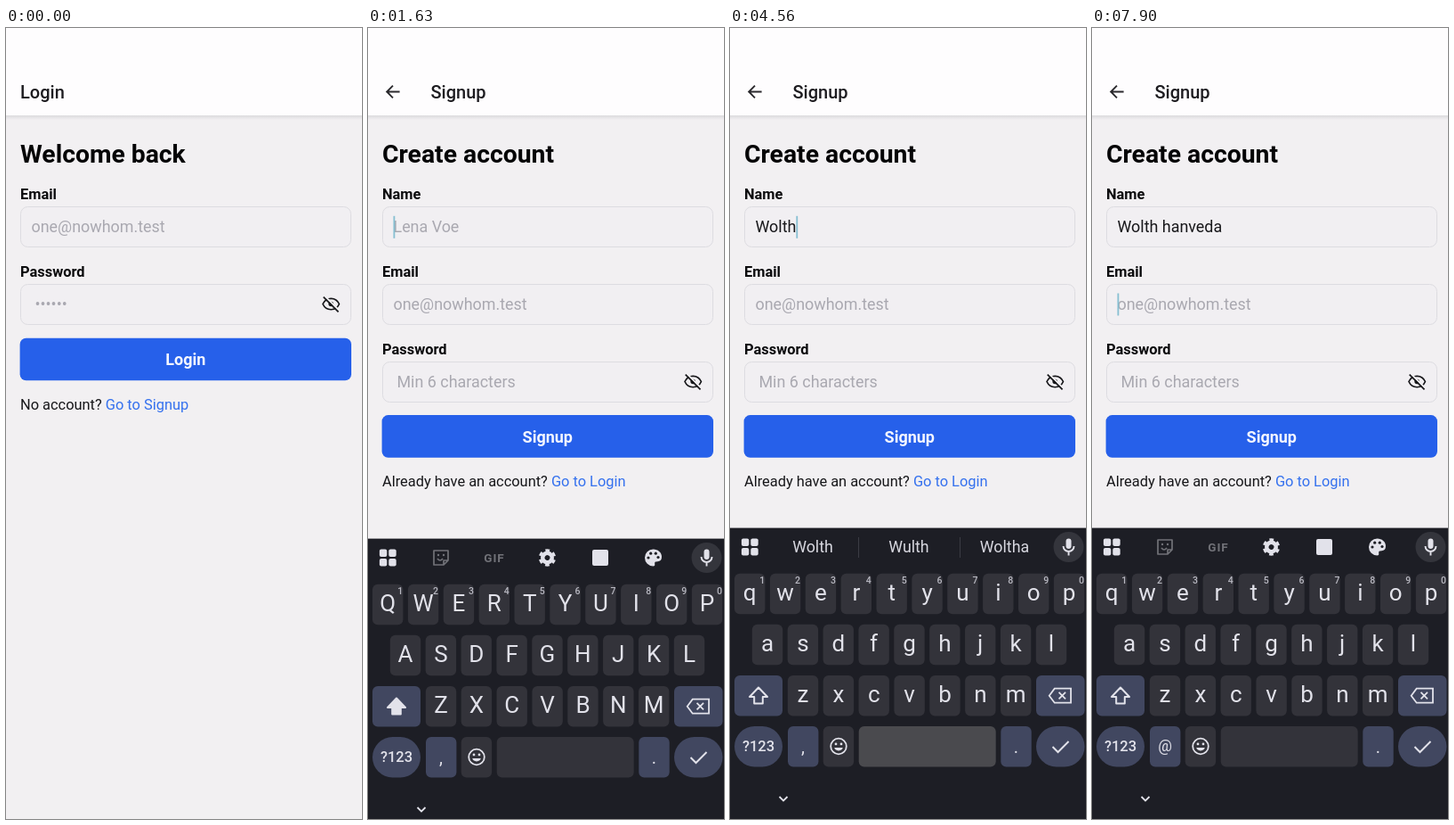
Write an HTML page that moves like this. It is 400 px wide and 887 px high and loops after 8000 ms.

```html
<!DOCTYPE html>
<html lang="en">
<head>
<meta charset="utf-8">
<title>Signup form</title>
<style>
  html, body { margin: 0; width: 100%; height: 100%; overflow: hidden; background: #f2f0f2; }
  svg { display: block; width: 100vw; height: 100vh; }
  text { font-family: Roboto, "Noto Sans", sans-serif; white-space: pre; }
</style>
</head>
<body>
<svg id="stage" viewBox="0 0 400 887"></svg>
<script>
const LOOP = 8000;
const BG = '#f2f0f2', INK = '#17171a', HINT = '#a9a8b0', BLUE = '#2660ea';
const KB = '#1d1e25', KEY = '#33333a', KEY_DOWN = '#4a4a4e', SPECIAL = '#414760', GLYPH = '#e2e2ea';
const KB_TOP = 560.6, NAME_X = 28.5;

const stage = document.getElementById('stage');

function el(tag, attrs, parent, content) {
  const node = document.createElementNS('http://www.w3.org/2000/svg', tag);
  for (const k in attrs) node.setAttribute(k, attrs[k]);
  if (content !== undefined) node.textContent = content;
  parent.appendChild(node);
  return node;
}
const group = (parent, x = 0, y = 0) => el('g', { transform: `translate(${x} ${y})` }, parent);
const rect = (p, x, y, width, height, rx, fill, more) => el('rect', { x, y, width, height, rx, fill, ...more }, p);
const circle = (p, cx, cy, r, fill, more) => el('circle', { cx, cy, r, fill, ...more }, p);
const line = (p, d, stroke, width = 2, more) =>
  el('path', { d, stroke, 'stroke-width': width, fill: 'none', ...more }, p);
const label = (p, x, y, size, fill, str, weight = 400, anchor = 'start') =>
  el('text', { x, y, fill, 'font-size': size, 'font-weight': weight, 'text-anchor': anchor }, p, str);
const show = (node, on) => node.setAttribute('visibility', on ? 'inherit' : 'hidden');
const setText = (node, str) => { if (node.textContent !== str) node.textContent = str; };

// ---------- form screens ----------
const defs = el('defs', {}, stage);
const shade = el('linearGradient', { id: 'shade', x1: 0, y1: 0, x2: 0, y2: 1 }, defs);
el('stop', { offset: 0, 'stop-color': '#d9d8db' }, shade);
el('stop', { offset: 1, 'stop-color': BG }, shade);

function screen(title, titleX, heading) {
  const g = el('g', {}, stage);
  rect(g, 0, 0, 400, 887, 0, BG);
  rect(g, 0, 97.5, 400, 5.5, 0, 'url(#shade)');
  rect(g, 0, 0, 400, 98, 0, '#fefdfe');
  label(g, titleX, 79, 20, '#1d1c20', title, 500);
  label(g, 16, 151, 28.3, '#050506', heading, 700);
  return g;
}

function eyeOff(p, y) {
  const g = group(p, 365.2, y);
  line(g, 'M-9.2 0C-5.6 -8.3 5.6 -8.3 9.2 0C5.6 8.3 -5.6 8.3 -9.2 0Z', INK, 1.7);
  circle(g, 0, 0, 2.8, INK);
  line(g, 'M-7 -8.8L9.5 7.7', BG, 2);
  line(g, 'M-8.5 -7.9L8.3 8.9', INK, 1.7);
}

function field(p, title, y, hint, secret) {
  label(p, 16, y - 8.3, 16.4, '#0b0b0d', title, 600);
  rect(p, 16.5, y + .5, 371, 45, 8, '#f1eff2', { stroke: '#dddce1' });
  if (secret) eyeOff(p, y + 22.5);
  return label(p, secret ? 32.5 : NAME_X, y + 29.4, 17.9, HINT, hint);
}

function footer(p, y, name, ask, link) {
  rect(p, 15.6, y, 372.4, 47.6, 7, BLUE);
  label(p, 201.8, y + 30.6, 18, '#f4f6ff', name, 600, 'middle');
  const t = label(p, 16, y + 80.3, 16.4, INK, ask + ' ');
  return el('tspan', { fill: '#3571ee' }, t, link);
}

const login = screen('Login', 16, 'Welcome back');
field(login, 'Email', 200, 'one@nowhom.test');
field(login, 'Password', 287, '••••••', true);
const loginLink = footer(login, 347.7, 'Login', 'No account?', 'Go to Signup');

const signup = screen('Signup', 70.5, 'Create account');
line(signup, 'M35.6 71.5H21.5M28 64.7L21.2 71.5L28 78.3', '#2a292d', 1.9);
const nameHint = field(signup, 'Name', 200, 'Lena Voe');
const nameText = label(signup, NAME_X, 229.4, 17.9, INK, '');
field(signup, 'Email', 287, 'one@nowhom.test');
field(signup, 'Password', 374, 'Min 6 characters', true);
footer(signup, 434.1, 'Signup', 'Already have an account?', 'Go to Login');
const caret = rect(signup, 0, 0, 1.8, 25, 0, '#86bfd2');

// ---------- keyboard ----------
const board = el('g', {}, stage);
rect(board, 0, KB_TOP, 400, 340, 0, KB);

[[-9.4, -9.4], [1, -9.4], [-9.4, 1], [1, 1]].forEach(([x, y]) => rect(board, 22.3 + x, 582 + y, 8.4, 8.4, 2, GLYPH));
circle(board, 380.5, 582, 17, '#34353c');
const mic = group(board, 380.5, 582);
rect(mic, -3, -9.5, 6, 11.5, 3, GLYPH);
line(mic, 'M-6 -1A6 6 0 0 0 6 -1M0 5V9.5', GLYPH, 1.9);

const tools = el('g', {}, board);
const sticker = group(tools, 82, 582);
line(sticker, 'M-8 -8H8V3L3 8H-8ZM8 3H3V8M-4 1Q-1 5 2 1', '#717278', 1.7, { 'stroke-linejoin': 'round' });
circle(sticker, -3, -3, 1.2, '#717278');
circle(sticker, 3, -3, 1.2, '#717278');
el('text', { x: 142, y: 587, fill: '#717278', 'font-size': 13.5, 'font-weight': 700, 'letter-spacing': 1, 'text-anchor': 'middle' }, tools, 'GIF');
const gear = el('g', { transform: 'translate(201.5 582) rotate(30)' }, tools);
circle(gear, 0, 0, 5.2, 'none', { stroke: GLYPH, 'stroke-width': 4.6 });
circle(gear, 0, 0, 8.3, 'none', { stroke: GLYPH, 'stroke-width': 2.8, 'stroke-dasharray': '4.6 4.09', 'stroke-dashoffset': 2.3 });
rect(tools, 252, 573, 18, 18, 2, GLYPH);
const palette = group(tools, 320.5, 582);
el('path', { d: 'M0 -9.5A9.5 9.5 0 0 0 0 9.5C3 9.5 1 6.5 2 5C3 3.5 9.5 6 9.5 -1C9.5 -6 5 -9.5 0 -9.5Z', fill: GLYPH }, palette);
[[-5.5, 0], [-2.8, -4.8], [2.8, -4.8], [5.5, -.5]].forEach(([x, y]) => circle(palette, x, y, 1.6, KB));

const strip = el('g', {}, board);
line(strip, 'M144.5 571V594M258.5 571V594', '#3b3c44', 1);
const words = [93, 201, 308.5].map(x => label(strip, x, 588.2, 17.8, '#d8d8e0', '', 400, 'middle'));

const PITCH = 39.87;
const keys = {}, letters = [];

function addKey(id, x, y, w, fill = KEY, rx = 6) {
  keys[id] = { node: rect(board, x, y, w, 45.5, rx, fill), fill };
}
function letterRow(chars, cx, y, hints) {
  [...chars].forEach((c, i) => {
    const x = cx + i * PITCH;
    addKey(c, x - 17.2, y, 34.4);
    letters.push({ c, node: label(board, x, y + 30.3, 26, GLYPH, c, 400, 'middle') });
    if (hints) label(board, x + 14, y + 10.8, 10.5, '#b9b9c2', (i + 1) % 10, 500, 'middle');
  });
}
letterRow('qwertyuiop', 22.2, 611.7, true);
letterRow('asdfghjkl', 42, 668.8);
letterRow('zxcvbnm', 82, 726);

addKey('shift', 5, 726, 54, SPECIAL);
const shiftIcon = el('path', {
  d: 'M32 739.5L42 750H36.8V757.5H27.2V750H22Z',
  stroke: GLYPH, 'stroke-width': 2, 'stroke-linejoin': 'round'
}, board);
addKey('back', 344, 726, 54.5, SPECIAL);
line(board, 'M358.7 748.7L364.7 740.7H383V756.7H364.7ZM369.5 744.9L377 752.4M377 744.9L369.5 752.4', GLYPH, 1.8);

addKey('num', 5, 783, 54, SPECIAL, 22.7);
label(board, 32, 811.3, 16.5, GLYPH, '?123', 500, 'middle');
addKey('comma', 65, 783, 34.4, SPECIAL);
const comma = label(board, 82, 813, 20, GLYPH, ',', 400, 'middle');
addKey('emoji', 104.7, 783, 34.4);
const face = group(board, 122, 805.5);
circle(face, 0, 0, 8.8, 'none', { stroke: GLYPH, 'stroke-width': 1.8 });
circle(face, -3, -2.6, 1.4, GLYPH);
circle(face, 3, -2.6, 1.4, GLYPH);
el('path', { d: 'M-4.8 1.6H4.8A5 4.6 0 0 1 -4.8 1.6Z', fill: GLYPH }, face);
addKey(' ', 144.7, 783, 154);
addKey('.', 304.3, 783, 34.4, SPECIAL);
label(board, 321.5, 813, 20, GLYPH, '.', 400, 'middle');
addKey('enter', 344, 783, 54.5, SPECIAL, 22.7);
line(board, 'M362.5 806L368.5 812L380.5 800', GLYPH, 2);
line(board, 'M55.5 862L60 866.5L64.5 862', GLYPH, 1.8);

// ---------- timeline ----------
// press time, commit time, character, suggestions (* = bold)
const TYPING = [
  [2420, 2490, 'W', 'W|We|Will'],
  [3090, 3160, 'o', 'Wo|Wolth|Won'],
  [3630, 3700, 'l', 'Wol|Wolth|Wool'],
  [3960, 4030, 't', 'Wolt|Wolth|Wolts'],
  [4160, 4230, 'h', 'Wolth|Wulth|Woltha'],
  [4560, 4630, ' ', 'and|is|the'],
  [4900, 4970, 'h', 'h|he|how'],
  [5360, 5430, 'a', 'ha|has|have'],
  [5560, 5630, 'n', 'han|hand|hang'],
  [6030, 6100, 'v', 'hanv|hanveda|hand'],
  [6230, 6300, 'e', 'hanve|*hanveda|hant'],
  [6630, 6700, 'd', 'hanved|*hanveda|hanvel'],
  [7100, 7160, 'a', 'hanveda|hanvedas|Hanveda']
];
const SLIDE = [[0, 340], [1500, 200], [1566, 66], [1630, 12], [1695, 0]];
const PUSH_AT = 566, PUSH_MS = 450, FOCUS_AT = 1425, EMAIL_AT = 7700;
const clamp = v => Math.max(0, Math.min(1, v));
const lastBefore = (rows, t, col = 0) => rows.filter(r => r[col] <= t).pop();

function drawPush(t) {
  const step = 500 + Math.floor((t - 500) / 66.67) * 66.67;
  const p = clamp((step - PUSH_AT) / PUSH_MS);
  const ease = 1 - (1 - p) ** 4;
  login.setAttribute('transform', `translate(${-40 * ease} 0)`);
  signup.setAttribute('transform', `translate(${40 * (1 - ease)} 0)`);
  signup.setAttribute('opacity', clamp((step - PUSH_AT - 30) / 100));
  loginLink.setAttribute('opacity', t >= 500 ? .6 : 1);
}

function drawForm(t) {
  const typed = TYPING.filter(k => k[1] <= t).map(k => k[2]).join('');
  setText(nameText, typed);
  show(nameHint, !typed);

  const onEmail = t >= EMAIL_AT;
  const last = lastBefore(TYPING, t, 1);
  const since = onEmail ? EMAIL_AT : last ? last[1] + 60 : 1400;
  const x = onEmail || !typed ? NAME_X : NAME_X + nameText.getComputedTextLength();
  caret.setAttribute('x', x);
  caret.setAttribute('y', onEmail ? 297.5 : 210.8);
  show(caret, t >= FOCUS_AT && (t < since || (t - since) % 1000 < 500));
}

function drawBoard(t) {
  const offset = lastBefore(SLIDE, t)[1];
  board.setAttribute('transform', `translate(0 ${offset})`);

  const upper = t < 2550;
  letters.forEach(({ c, node }) => setText(node, upper ? c.toUpperCase() : c));
  shiftIcon.setAttribute('fill', upper ? GLYPH : 'none');

  const press = TYPING.find(k => t >= k[0] && t < k[1]);
  const down = press && press[2].toLowerCase();
  for (const id in keys) keys[id].node.setAttribute('fill', id === down ? KEY_DOWN : keys[id].fill);

  const last = lastBefore(TYPING, t, 1);
  const suggesting = last && t >= 2550 && t < EMAIL_AT + 125;
  show(strip, suggesting);
  show(tools, !suggesting);
  if (suggesting) last[3].split('|').forEach((word, i) => {
    setText(words[i], word.replace('*', ''));
    words[i].setAttribute('font-weight', word[0] === '*' ? 700 : 400);
  });

  const atSign = t >= EMAIL_AT + 125;
  setText(comma, atSign ? '@' : ',');
  comma.setAttribute('y', atSign ? 811 : 813);
  comma.setAttribute('font-size', atSign ? 17.5 : 20);
}

function draw(now) {
  const t = now % LOOP;
  drawPush(t);
  drawForm(t);
  drawBoard(t);
}

const start = performance.now();
function tick() {
  draw(performance.now() - start);
  requestAnimationFrame(tick);
}
tick();
</script>
</body>
</html>
```
